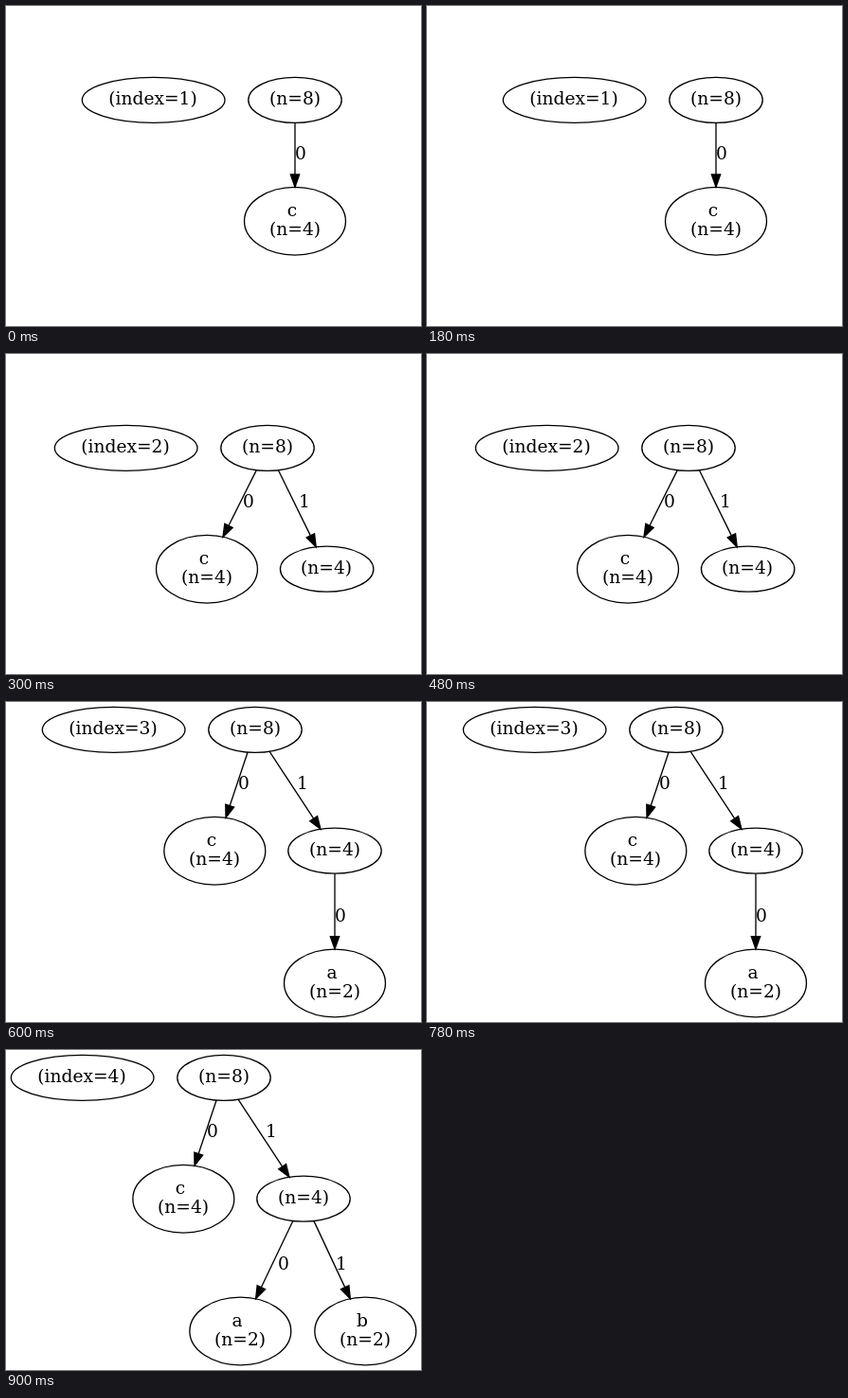
Write an HTML page that moves like this. It is 438 px wide and 338 px high and loops after 1200 ms.

```html
<!DOCTYPE html>
<html lang="en">
<head>
<meta charset="utf-8">
<title>Growing tree</title>
<style>
  html, body { margin: 0; width: 100%; height: 100%; overflow: hidden; background: #fff; }
  svg { display: block; }
  .step { visibility: hidden; animation: show 1200ms step-end infinite; }
  ellipse, line, polygon { stroke: #000; stroke-width: 1.333; }
  ellipse { fill: none; }
  text { font: 18.667px "DejaVu Serif", "Noto Serif", serif; text-anchor: middle; }
  @keyframes show {
    0% { visibility: visible; }
    25%, 100% { visibility: hidden; }
  }
</style>
</head>
<body>
<svg id="stage" width="438" height="338" viewBox="0 0 438 338"></svg>
<script>
const WIDTH = 438, HEIGHT = 338;
const STEP_MS = 300, LOOP_MS = 1200;

// Layout is in points, drawing in pixels.
const px = pt => pt * 4 / 3;
const MARGIN = 4, NODE_GAP = 18, ROW_GAP = 51;
const INDEX = { rx: 56.5, ry: 18 }, PLAIN = { rx: 36.9, ry: 18 }, LEAF = { rx: 40.1, ry: 26.9 };

// Each step adds one node; every child holds half of its parent's n.
const GROWTH = [
  { parent: 0, bit: 0, letter: "c" },
  { parent: 0, bit: 1 },
  { parent: 2, bit: 0, letter: "a" },
  { parent: 2, bit: 1, letter: "b" }
];

const rowY = depth => depth === 0
  ? MARGIN + PLAIN.ry
  : MARGIN + 2 * PLAIN.ry + depth * ROW_GAP + (2 * depth - 1) * LEAF.ry;

function buildTree(size) {
  const nodes = [{ ...PLAIN, n: 8, depth: 0, kids: [] }];
  for (const { parent, bit, letter } of GROWTH.slice(0, size)) {
    const up = nodes[parent];
    const node = { ...(letter ? LEAF : PLAIN), up, bit, letter, n: up.n / 2, depth: up.depth + 1, kids: [] };
    up.kids.push(node);
    nodes.push(node);
  }
  return nodes;
}

// A parent sits midway over its children, or leans away from one that has its own.
function place(node, x) {
  node.x = x;
  node.y = rowY(node.depth);
  const [a, b] = node.kids;
  if (b) {
    const gap = a.rx + NODE_GAP + b.rx;
    const lean = b.kids.length ? 1 / 3 : 1 / 2;
    place(a, x - Math.ceil(gap * lean));
    place(b, x + Math.floor(gap * (1 - lean)));
  } else if (a) {
    place(a, x);
  }
}

const text = (x, y, s) =>
  `<text x="${Math.floor(px(x))}" y="${Math.round(px(y))}">${s}</text>`;

const oval = ({ x, y, rx, ry }) =>
  `<ellipse cx="${px(x)}" cy="${px(y)}" rx="${px(rx)}" ry="${px(ry)}"/>`;

function drawNode(node) {
  const { x, y, n, letter } = node;
  const label = `(n=${n})`;
  return oval(node) + (letter
    ? text(x - 2.25, y - 3.8, letter) + text(x, y + 11.2, label)
    : text(x, y + 3.7, label));
}

// Straight from centre to centre, clipped at both ovals.
function drawEdge(node) {
  const { up, bit } = node;
  const dx = node.x - up.x, dy = node.y - up.y, len = Math.hypot(dx, dy);
  const ux = dx / len, uy = dy / len;
  const clip = ({ rx, ry }) => 1 / Math.hypot(ux / rx, uy / ry);
  const at = (along, side = 0) =>
    [px(up.x + ux * along - uy * side), px(up.y + uy * along + ux * side)];
  const tip = len - clip(node), base = tip - 10;
  const [x1, y1] = at(clip(up)), [x2, y2] = at(base);
  const labelX = up.x + dx * (0.4 + 0.13 * bit) + 4.5;
  const labelY = node.y - LEAF.ry - ROW_GAP / 2 + 3.7;
  return `<line x1="${x1}" y1="${y1}" x2="${x2}" y2="${y2}"/>` +
    `<polygon points="${[at(tip), at(base, 3.5), at(base, -3.5)].join(" ")}"/>` +
    text(labelX, labelY, bit);
}

function drawStep(index) {
  const nodes = buildTree(index);
  const badge = { ...INDEX, x: MARGIN + INDEX.rx, y: rowY(0) };
  place(nodes[0], badge.x + Math.ceil(INDEX.rx + NODE_GAP + PLAIN.rx));

  const right = Math.max(...nodes.map(d => d.x + d.rx)) + MARGIN;
  const bottom = Math.max(...nodes.map(d => d.y + d.ry)) + MARGIN;
  const left = Math.ceil((WIDTH - px(right)) / 2);
  const top = Math.ceil((HEIGHT - px(bottom)) / 2);
  const delay = (index - 1) * STEP_MS - LOOP_MS;

  return `<g class="step" style="animation-delay:${delay}ms" transform="translate(${left} ${top})">` +
    oval(badge) + text(badge.x, badge.y + 3.7, `(index=${index})`) +
    nodes.map(drawNode).join("") +
    nodes.slice(1).map(drawEdge).join("") + "</g>";
}

document.getElementById("stage").innerHTML =
  GROWTH.map((_, i) => drawStep(i + 1)).join("");
</script>
</body>
</html>
```
